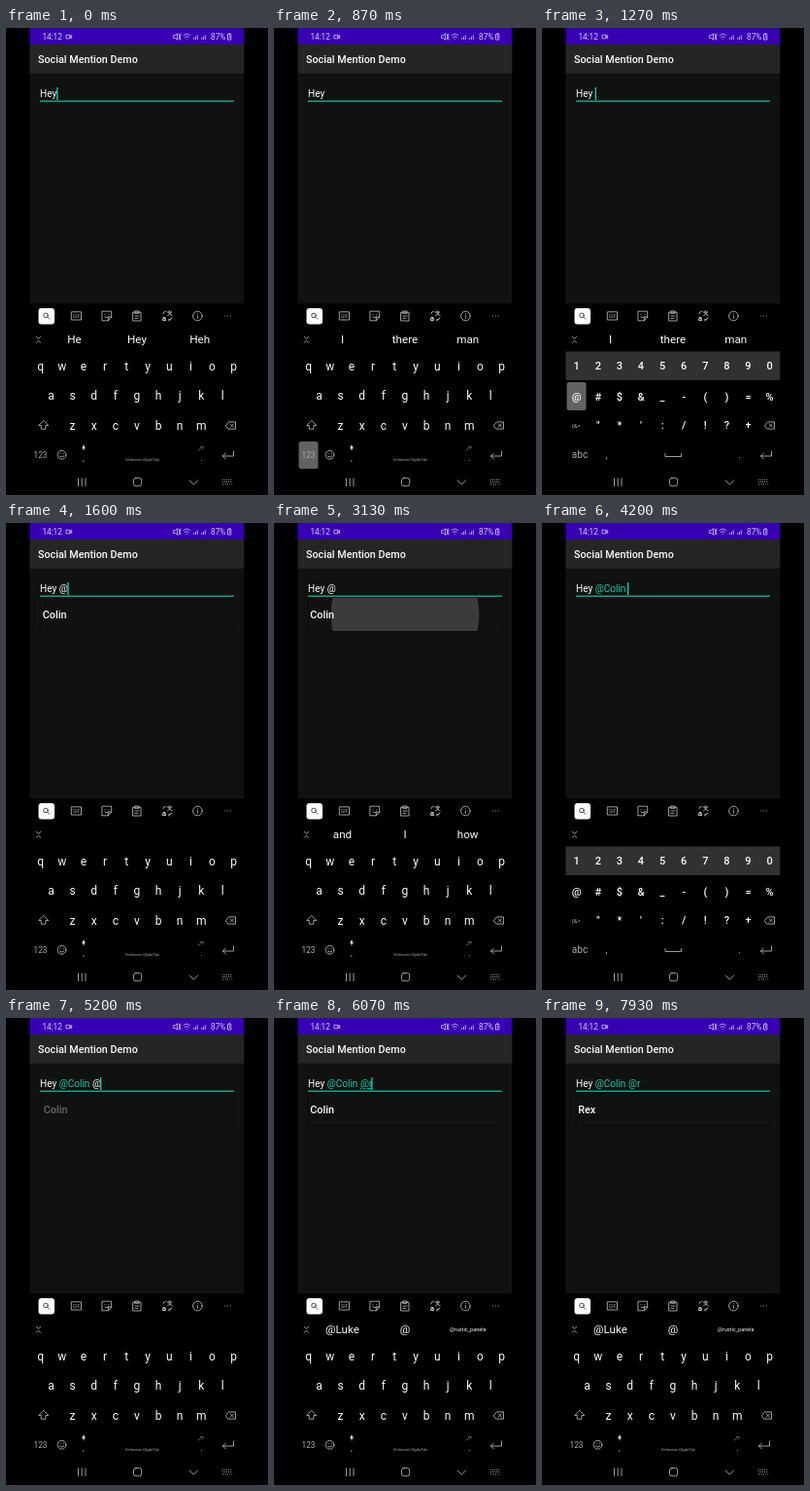
These frames come from a looping animation (270 by 480 pixels, 8 s). An HTML page:

```html
<!DOCTYPE html>
<html lang="en">
<head>
<meta charset="utf-8">
<title>Mention demo</title>
<style>
  html, body { margin: 0; width: 100%; height: 100%; overflow: hidden; background: #000; }
  svg { display: block; width: 100vw; height: 100vh; }
  text { font-family: Roboto, "Noto Sans", sans-serif; fill: #fafafa; white-space: pre; }
  .mid { text-anchor: middle; }
  .bold { font-weight: 500; }
  .icon { fill: none; stroke: #c4c4c4; stroke-width: .8; stroke-linecap: round; stroke-linejoin: round; }
  .status { stroke: #d6caf4; }
  .dim { fill: #acacac; }
  .composing { text-decoration: underline; }
</style>
</head>
<body>
<svg id="stage" viewBox="0 0 270 480" xmlns="http://www.w3.org/2000/svg"></svg>
<script>
const LOOP = 8000;
const TEAL = '#12cdb8';
const COLUMN = 22.1;
const LEFT = 24.5, WIDTH = 220.8;
const stage = document.getElementById('stage');

const label = (x, y, size, str, attrs = '') =>
  `<text x="${x}" y="${y}" font-size="${size}" ${attrs}>${str.replace(/&/g, '&amp;')}</text>`;
const centered = (x, y, size, str, cls = '') => label(x, y, size, str, `class="mid ${cls}"`);
const rect = (x, y, w, h, fill, attrs = '') =>
  `<rect x="${x}" y="${y}" width="${w}" height="${h}" fill="${fill}" ${attrs}/>`;
const band = (y, h, fill) => rect(LEFT, y, WIDTH, h, fill);
const icon = (d, attrs = '', cls = '') => `<path class="icon ${cls}" d="${d}" ${attrs}/>`;
const circle = (x, y, r, attrs = '') => `<circle class="icon" cx="${x}" cy="${y}" r="${r}" ${attrs}/>`;
const row = (chars, x, y, size, cls) =>
  [...chars].map((c, i) => centered(x + i * COLUMN, y, size, c, cls)).join('');

const backspace = x => icon(`M${x - 5} 408.5l3-3.6h7v7.2h-7zM${x - .4} 406.8l3.4 3.4m0-3.4l-3.4 3.4`);
const enter = x => icon(`M${x + 5.5} 435v5h-11m3-3l-3 3l3 3`);

function statusBar() {
  const bars = x => icon(`M${x} 11.5v-1.2m1.8 1.2v-2.4m1.8 2.4v-3.8`, '', 'status');
  return band(0, 16.5, '#3700b3') +
    label(37.4, 11.6, 8.2, '14:12', 'style="fill:#d6caf4"') +
    icon('M62.3 7.2h3.6v3.6h-3.6zM65.9 8.5l1.8-1v3l-1.8-1', 'stroke-width=".7"', 'status') +
    icon('M173 7.6h1.4l2-1.8v6.4l-2-1.8h-1.4zM178 6l2 6M180 6l-2 6', '', 'status') +
    icon('M183 7.5q3.3-3 6.6 0M184.4 9.3q1.9-1.6 3.8 0M186.3 11.2v.1', '', 'status') +
    bars(193.7) + bars(201.7) +
    label(211, 11.7, 8.3, '87%', 'style="fill:#d6caf4"') +
    icon('M228.9 6.4h3v5.6h-3zM230 5.4h.8M230.4 8v2', '', 'status');
}

function toolbar() {
  return rect(33.5, 288, 16.5, 16.5, '#fff', 'rx="3"') +
    circle(41, 295.4, 2.3, 'style="stroke:#222"') + icon('M42.8 297.2l2 2', 'style="stroke:#222"') +
    icon('M67.7 291.8h9.8v8.2h-9.8z') + centered(72.6, 297.7, 4.8, 'GIF', 'dim') +
    icon('M99.3 291.2h9.4v5.8l-3.4 3.8h-6zM108.7 297h-3.4v3.8M102 294.5v.2m4-.2v.2M101.8 297q2 1.6 4 0') +
    icon('M131 292.2h8v8.8h-8zM133 291h4v2.3h-4zM133 296h4m-4 2.4h3') +
    label(160.7, 300.5, 8, 'a', 'class="bold"') +
    icon('M166 292h4.6m-2.3-1.3v1.3m1.8 0q-1 3-3.6 3.8m1-3q1 2.4 3.6 2.8M162 293.5q0-2.2 2.4-2.2M171 297.8q0 2.3-3.4 2.3m1.2-1.2l-1.2 1.2l1.2 1.2') +
    circle(197.4, 296, 4.8) + icon('M197.4 295.5v2.8M197.4 293.4v.1') +
    icon('M225.6 296h.1M228.5 296h.1M231.4 296h.1', 'stroke-width="1.2"') +
    icon('M31.3 317.2l2.2 2.2l2.2-2.2M31.3 323.4l2.2-2.2l2.2 2.2');
}

function letters() {
  return row('qwertyuiop', 35.7, 352, 12) + row('asdfghjkl', 46.5, 382.4, 12) + row('zxcvbnm', 68.6, 412.5, 12) +
    icon('M38.5 403.7l-4.8 4.8h2.5v3.7h4.6v-3.7h2.5z') + backspace(231.5) +
    centered(35.5, 442, 8.2, '123', 'dim') +
    circle(57.5, 438.8, 4.4) + icon('M55.9 437.5v.2m3.2-.2v.2M55.2 440q2.3 2.5 4.6 0') +
    rect(79, 429, 2, 3.4, '#ddd', 'rx="1"') + icon('M78.2 431.6q1.8 2.6 3.6 0M80 433.2v.8', 'stroke-width=".6"') +
    centered(80, 445, 9, ',', 'dim') + centered(140.5, 445.2, 4, 'Velmorrin GlydeTab', 'dim') +
    label(198, 434, 6, ',!?', 'font-style="italic" class="dim"') +
    centered(201.5, 445, 9, '.', 'dim') + enter(229);
}

function symbols() {
  return band(332.5, 29.5, '#303230') +
    row('1234567890', 35.7, 350.8, 11, 'bold') + row('@#$&_-()=%', 35.7, 382.5, 11, 'bold') +
    row('"*\':/!?+', 57.8, 412.3, 11, 'bold') + centered(35.3, 410.8, 6, '{&=', 'dim') + backspace(234.5) +
    centered(39, 441.8, 10, 'abc', 'dim') + centered(66.5, 442, 10, ',', 'dim') +
    icon('M127 437.5v3h16.5v-3') + centered(203.5, 442, 10, '.', 'dim') + enter(231);
}

function navBar() {
  return icon('M74.5 463v7.6M78.2 463v7.6M82 463v7.6') +
    '<rect class="icon" x="131.5" y="462.6" width="8.2" height="8.2" rx="2.4"/>' +
    icon('M189.2 465l4.2 4.2l4.2-4.2') +
    icon('M223.2 464.3h10M223.2 466.6h10M223.2 469h1M226 469h4.6M232.4 469h.8',
      'style="stroke-width:.9;stroke-linecap:butt" stroke-dasharray="1 1"');
}

stage.innerHTML = `
  <defs><clipPath id="itemClip">${rect(35, 77, 200, 34, '#fff')}</clipPath></defs>
  ${rect(0, 0, 270, 480, '#000')}
  ${band(46, 237.3, '#10120f')}
  ${band(16, 30.7, '#252525')}
  ${statusBar()}
  ${label(33, 35.6, 10.75, 'Social Mention Demo', 'class="bold"')}
  <text id="field" x="35" y="71.2" font-size="10.05"></text>
  ${rect(35, 74.6, 200, 1.2, '#1dbdac')}
  ${rect(0, 61, 1.3, 13, TEAL, 'id="cursor"')}
  <g id="popup">
    ${rect(35, 77, 200, 34, '#10120f', 'stroke="#0d0e0c" stroke-width=".8"')}
    <g clip-path="url(#itemClip)"><circle id="ripple" cx="135" cy="94" fill="#3a3b3a"/></g>
    ${label(37.3, 97.6, 10.8, '', 'id="item" class="bold"')}
  </g>
  ${toolbar()}
  ${[70.5, 135, 199.7].map(x => centered(x, 324.2, 11.7, '', 'hint')).join('')}
  ${rect(0, 0, 0, 0, '#626262', 'id="press" rx="2.5"')}
  <g id="letters">${letters()}</g>
  <g id="symbols">${symbols()}</g>
  ${navBar()}`;

const part = id => document.getElementById(id);
const [field, cursor, popup, ripple, item, press, letterKeys, symbolKeys] =
  ['field', 'cursor', 'popup', 'ripple', 'item', 'press', 'letters', 'symbols'].map(part);
const hints = [...stage.querySelectorAll('.hint')];

// Step tracks hold [start time, value...]; the latest started entry wins.
const typed = [
  [0, 'Hey', '', '', 52.2], [130, 'Hey ', '', '', 54.7], [1330, 'Hey @', '', '', 63.4],
  [3200, 'Hey ', '@Colin', ' ', 88], [5070, 'Hey ', '@Colin', ' @', 97],
  [6070, 'Hey ', '@Colin <tspan class="composing">@r</tspan>', '', 100.2],
  [6330, 'Hey ', '@Colin @r', '', 100.2]
];
const blink = [
  [0, 1], [730, 0], [1270, 1], [1870, 0], [2330, 1], [2870, 0], [3200, 1], [3670, 0], [4200, 1],
  [4730, 0], [5070, 1], [5930, 0], [6070, 1], [6870, 0], [7400, 1], [7930, 0]
];
const predictions = [
  [0, 'He', 'Hey', 'Heh'], [200, 'I', 'there', 'man'], [1330, '', '', ''], [1670, 'and', 'I', 'how'],
  [3200, '', '', ''], [5400, '@Luke', '@', '@rustic_panela']
];
const layout = [[0, 0], [1000, 1], [1330, 0], [4070, 1], [5070, 0]];
// Key presses: start, end, then the key's box.
const presses = [
  [70, 200, 91, 425, 99, 28], [870, 1000, 25.5, 425, 20, 28], [1200, 1330, 25.5, 364, 20, 29],
  [3930, 4070, 25.5, 425, 20, 28], [4800, 5070, 25.5, 364, 20, 29], [5930, 6070, 91, 334, 21.5, 29]
];

const at = (track, t) => track.filter(step => step[0] <= t).pop().slice(1);
const ramp = (t, from, to) => Math.min(1, Math.max(0, (t - from) / (to - from)));
const show = (node, on) => node.setAttribute('visibility', on ? 'visible' : 'hidden');
const setAll = (node, attrs) => Object.entries(attrs).forEach(([k, v]) => node.setAttribute(k, v));

function update(t) {
  const [before, mention, after, caret] = at(typed, t);
  field.innerHTML = `${before}<tspan fill="${TEAL}">${mention}</tspan>${after}`;
  cursor.setAttribute('x', caret);
  show(cursor, at(blink, t)[0]);

  at(predictions, t).forEach((word, i) => {
    hints[i].textContent = word;
    const small = word.length > 8;
    setAll(hints[i], { 'font-size': small ? 5.5 : 11.7, y: small ? 322 : 324.2 });
  });

  const opened = t < 5130 ? 1400 : 5130;
  const closing = t < 5130 ? ramp(t, 3180, 3330) : 0;
  popup.setAttribute('opacity', ramp(t, opened, opened + 190) - closing);
  item.setAttribute('x', 37.3 + 2 * (1 - ramp(t, opened, opened + 270)));
  item.textContent = t < 6330 ? 'Colin' : 'Rex';
  ripple.setAttribute('r', t >= 3130 && t < 3400 ? 76 + (t - 3130) * .35 : 0);

  const alt = at(layout, t)[0];
  show(letterKeys, !alt);
  show(symbolKeys, alt);

  const key = presses.find(([start, end]) => t >= start && t < end);
  show(press, key);
  if (key) {
    const [x, y, width, height] = key.slice(2);
    setAll(press, { x, y, width, height });
  }
}

const origin = performance.now();
function frame() {
  update((performance.now() - origin) % LOOP);
  requestAnimationFrame(frame);
}
frame();
</script>
</body>
</html>
```
